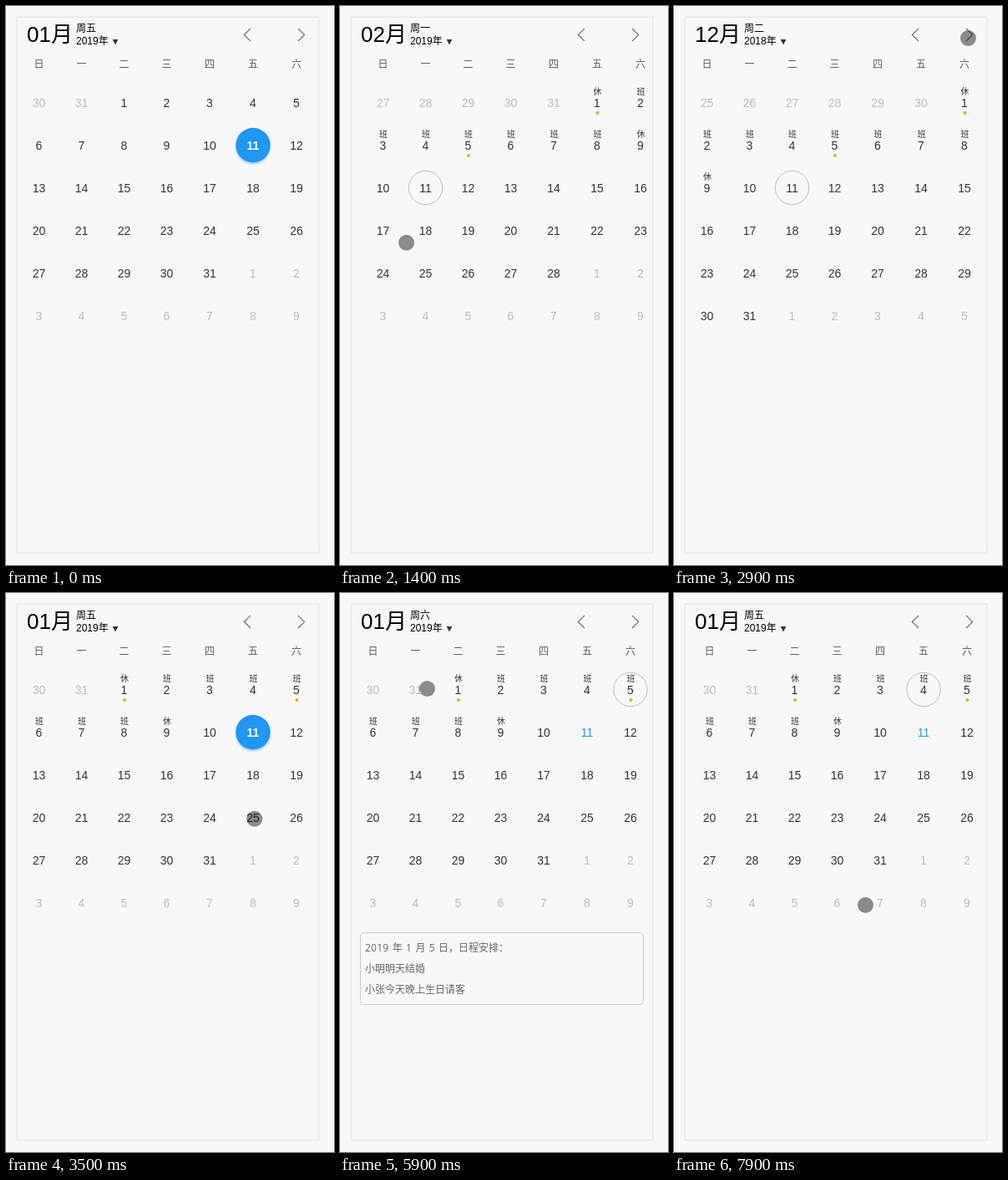
An HTML page for the animation above (8000 ms loop, 393 px wide and 669 px high).

```html
<!DOCTYPE html>
<html lang="zh-CN">
<head>
<meta charset="utf-8">
<title>Calendar</title>
<style>
html, body { margin: 0; width: 100%; height: 100%; overflow: hidden; background: #f8f8f8; }
svg { display: block; width: 393px; height: 669px; font-family: "Liberation Sans", "Noto Sans CJK SC", "Noto Sans CJK", sans-serif; }
.mid { text-anchor: middle; }
.week { font-size: 12px; fill: #5c5c5c; }
.day { font-size: 14px; fill: #333; }
.mark { font-size: 10px; fill: #333; }
.dim { fill: #bbb; }
.today { fill: #2196f3; }
.picked { fill: #fff; font-weight: bold; }
.ring { fill: none; stroke: #bbb; }
.note { font-family: "Open Sans", "Noto Sans CJK TC", "Noto Sans CJK", sans-serif; font-size: 12px; fill: #666; word-spacing: 1.2px; }
.num { letter-spacing: .22px; }
.frame { fill: none; stroke: #ccc; }
.arrow { fill: none; stroke: #6c6c6c; stroke-width: 1.1; }
</style>
</head>
<body>
<svg viewBox="0 0 393 669">
  <defs>
    <clipPath id="clip"><rect x="14" y="14" width="360" height="640"/></clipPath>
    <filter id="soft" x="-20%" y="-20%" width="140%" height="140%"><feGaussianBlur stdDeviation="1.3"/></filter>
  </defs>
  <rect width="393" height="669" fill="#f8f8f8"/>
  <rect x="13" y="13" width="362" height="642" opacity=".08" filter="url(#soft)"/>
  <rect x="13.5" y="13.5" width="361" height="641" fill="#f8f8f8" stroke="#e8e8e8"/>
  <g id="pages" clip-path="url(#clip)"></g>
  <text id="month" x="25" y="43" font-size="26"></text>
  <text id="weekday" x="84" y="31" font-size="12"></text>
  <text id="year" x="84" y="46" font-size="12"></text>
  <path d="M127.7 40h6.6l-3.3 6.6z" fill="#333"/>
  <path class="arrow" d="M293 27l-7.7 7.5 7.7 7.5M350 27l7.7 7.5-7.7 7.5"/>
  <g id="card"></g>
  <circle id="cursor" r="9.5" fill="#000" fill-opacity=".44"/>
</svg>
<script>
const LOOP = 8000, STEP = 100, WIDTH = 360;
const WEEK = [...'日一二三四五六'];
const $ = id => document.getElementById(id);

// Months count from January 2019; picks without a slide switch at once
const picks = [
  { at: 0, month: 0, day: 11 },
  { at: 900, month: 1, day: 11, slide: [632, 1100] },
  { at: 1600, month: 0, day: 11, slide: [1350, 1814] },
  { at: 2500, month: -1, day: 11 },
  { at: 3300, month: 0, day: 11 },
  { at: 4300, month: 0, day: 1 },
  { at: 5100, month: 0, day: 5 },
  { at: 6300, month: -1, day: 31, slide: [6250, 6700] },
  { at: 7600, month: 0, day: 4, slide: [7550, 7920] }
];

// Each move glides the pointer to a point; bow bends the path downwards
const home = { x: 344, y: 171 };
const moves = [
  { from: 100, to: 400, x: 291, y: 271 },
  { from: 500, to: 900, x: 51, y: 299 },
  { from: 1300, to: 1800, x: 321, y: 143 },
  { from: 1800, to: 2200, x: 289, y: 36 },
  { from: 2400, to: 2900, x: 352, y: 38 },
  { from: 3200, to: 4100, x: 141, y: 118, bow: 290 },
  { from: 4200, to: 4300, x: 180, y: 138 },
  { from: 4300, to: 4700, x: 349, y: 116 },
  { from: 5000, to: 5300, x: 298, y: 150 },
  { from: 5400, to: 5900, x: 104, y: 114, bow: 60 },
  { from: 6200, to: 7100, x: 327, y: 377 },
  { from: 7100, to: 7400, x: 296, y: 371 },
  { from: 7500, to: 7900, x: 229, y: 373, bow: 12 }
];

const notes = {
  1: ['2019 年 1 月 1 日，日程安排：', '09:00-12:00：参加一个重要会议', '13:30-18:00：陪领导视察'],
  5: ['2019 年 1 月 5 日，日程安排：', '小明明天结婚', '小张今天晚上生日请客']
};

function ease(t, from, to) {
  const u = Math.min(1, Math.max(0, (t - from) / (to - from)));
  return u * u * (3 - 2 * u);
}

function pagePosition(t) {
  let pos = 0;
  picks.slice(1).forEach((p, i) => {
    const part = p.slide ? ease(t, ...p.slide) : +(t >= p.at);
    pos += (p.month - picks[i].month) * part;
  });
  return pos;
}

function pointerAt(t) {
  let { x, y } = home;
  for (const m of moves) {
    const k = ease(t, m.from, m.to);
    x += (m.x - x) * k;
    y += (m.y - y) * k + (m.bow || 0) * Math.sin(Math.PI * k);
  }
  return { x: x + .5, y: y + .5 };
}

const label = (x, y, cls, s) => `<text class="mid ${cls}" x="${x}" y="${y}">${s}</text>`;
const disc = (x, y, r, attrs) => `<circle cx="${x}" cy="${y}" r="${r}" ${attrs}/>`;

// The last three columns are one pixel wider
const colX = c => 39.5 + 51 * c + Math.max(0, c - 3.5);

function cell(date, x, y, month, sel) {
  const m = date.getMonth() + (date.getFullYear() - 2019) * 12, d = date.getDate();
  const own = m === month, today = own && m === 0 && d === 11;
  const picked = own && m === sel.month && d === sel.day;
  let out = '', cls = own ? '' : 'dim';
  if (today) cls = picked ? 'picked' : 'today';
  if (picked && today) {
    out += disc(x, y + 1.5, 20.7, 'fill="#2196f3" opacity=".45" filter="url(#soft)"');
    out += disc(x, y - .5, 20.7, 'fill="#2196f3"');
  } else if (picked) out += disc(x, y - .5, 20.2, 'class="ring"');
  out += label(x, y + 5, 'day ' + cls, d);
  if (sel !== picks[0] && m === sel.month && d < 10) {
    out += label(x + .5, y - 10, 'mark ' + cls, d === 1 || d === 9 ? '休' : '班');
    if (d === 1 || d === 5) out += disc(x + .5, y + 12, 2, `fill="#f5a623" opacity="${own ? 1 : .5}"`);
  }
  return out;
}

function page(month, pos, sel) {
  const lead = new Date(2019, month, 1).getDay();
  let out = WEEK.map((w, c) => label(colX(c), 74, 'week', w)).join('');
  for (let i = 0; i < 42; i++) {
    const date = new Date(2019, month, 1 - lead + i);
    out += cell(date, colX(i % 7), 116 + 51 * Math.floor(i / 7), month, sel);
  }
  return `<g transform="translate(${Math.round((month - pos) * WIDTH)} 0)">${out}</g>`;
}

function card(lines) {
  if (!lines) return '';
  const rows = lines.map((s, i) => {
    const text = s.replace(/[\d:-]+/g, '<tspan class="num">$&</tspan>');
    return `<text class="note" x="30" y="${429 + 25 * i}">${text}</text>`;
  });
  return '<rect class="frame" x="24.5" y="406.5" width="339" height="86" rx="4"/>' + rows.join('');
}

function draw(t) {
  const sel = picks.filter(p => p.at <= t).pop();
  const date = new Date(2019, sel.month, sel.day);
  const pos = pagePosition(t), { x, y } = pointerAt(t);
  $('pages').innerHTML = [-1, 0, 1].filter(m => Math.abs(m - pos) < 1)
    .map(m => page(m, pos, sel)).join('');
  $('month').textContent = String(date.getMonth() + 1).padStart(2, '0') + '月';
  $('weekday').textContent = '周' + WEEK[date.getDay()];
  $('year').textContent = date.getFullYear() + '年';
  $('card').innerHTML = card(sel.month === 0 && notes[sel.day]);
  $('cursor').setAttribute('transform', `translate(${x} ${y})`);
  $('cursor').style.display = t < moves[0].from ? 'none' : '';
}

const start = performance.now();
let shown = -1;
function tick() {
  // The screen refreshes ten times a second
  const elapsed = performance.now() - start + 15;
  const t = Math.floor(elapsed % LOOP / STEP) * STEP;
  if (t !== shown) draw(shown = t);
  requestAnimationFrame(tick);
}
tick();
</script>
</body>
</html>
```
